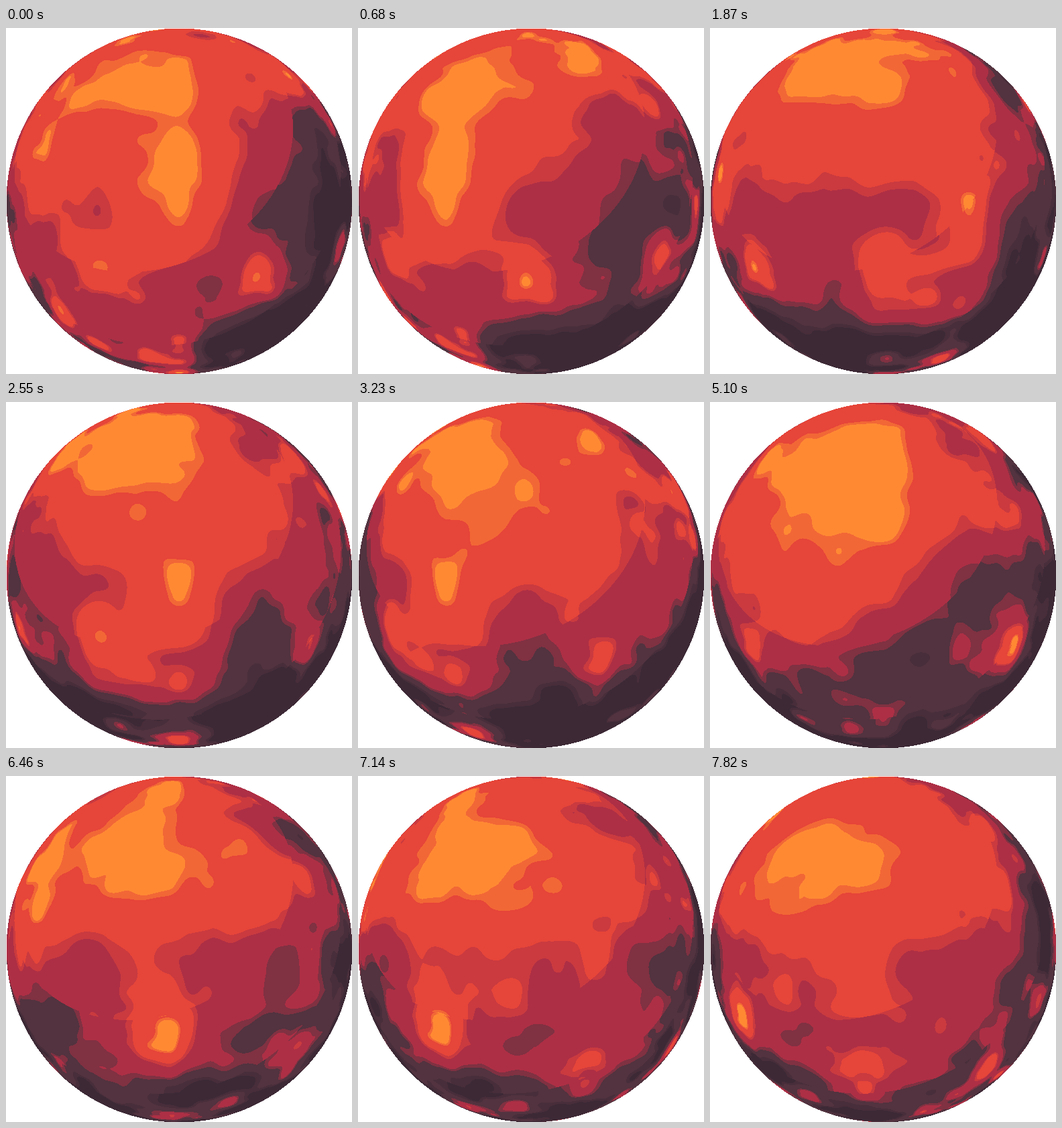
An HTML page with a canvas that plays this animation: 516x516 px, repeating every 7990 ms.

```html
<!DOCTYPE html>
<html lang="en">
<head>
<meta charset="utf-8">
<title>Rotating lava planet</title>
<style>
  html, body { margin: 0; width: 100%; height: 100%; overflow: hidden; background: #fff; }
  canvas { display: block; width: 100vw; height: 100vh; }
</style>
</head>
<body>
<canvas id="planet" width="516" height="516"></canvas>
<script>
const SIZE = 516;
const STEP_MS = 170, STEPS = 47, STEPS_PER_TURN = 60;
const COLS = 16, ROWS = 8;
const LIGHT = { x: 0.4, y: 0.3 };
const COLORS = [[255, 137, 51], [230, 69, 57], [173, 47, 69], [82, 51, 63], [61, 41, 54]];

// Terrain heights in percent; every noise octave reads this wrapping lattice.
const HEIGHTS = [
  [ 0, 60, 40, 20, 10, 20, 40, 10, 40, 40, 80, 40, 70, 50, 35, 60],
  [24, 59, 55, 30, 79, 24, 28,  9, 20, 63, 45, 61, 63, 62, 16, 61],
  [92, 46, 37, 33, 39, 61,  2, 22, 14, 82, 15, 21,  9, 79, 43, 70],
  [33, 49, 30, 81, 26, 63, 97, 53, 55, 51, 58,  5,  3, 31, 23, 25],
  [56, 70, 63, 83, 10, 88, 91, 89, 22, 66, 61, 35, 54, 93, 65, 69],
  [24, 33, 41, 18, 63, 10, 74,  5,  8, 83, 13, 60, 93, 62,  0, 60],
  [ 6, 38,  5,  3, 25, 87, 83, 70, 50, 90, 77, 27, 43, 45, 67, 50],
  [73, 21, 24,  0,  0, 26, 69, 33,  0, 66, 62, 19, 49, 43,  3, 25]
];
const lattice = Float32Array.from(HEIGHTS.flat(), h => h / 100);

const ctx = document.getElementById('planet').getContext('2d');
const image = ctx.createImageData(SIZE, SIZE);
const smooth = t => t * t * (3 - 2 * t);

function noise(x, y) {
  const ix = Math.floor(x), iy = Math.floor(y);
  const left = ix % COLS, right = (ix + 1) % COLS;
  const top = iy % ROWS * COLS, bottom = (iy + 1) % ROWS * COLS;
  const sx = smooth(x - ix), sy = smooth(y - iy);
  const a = lattice[top + left], b = lattice[top + right];
  const c = lattice[bottom + left], d = lattice[bottom + right];
  const upper = a + (b - a) * sx;
  return upper + (c + (d - c) * sx - upper) * sy;
}

const terrain = (x, y) =>
  0.5 * noise(x, y) + 0.25 * noise(2 * x, 2 * y) + 0.125 * noise(4 * x, 4 * y);

// Darkness grows away from the light, with two hard steps.
function darkness(u, v) {
  let d = smooth((Math.hypot(u - LIGHT.x, v - LIGHT.y) + 0.3) / 1.5);
  if (d < 0.362) d *= 0.9;
  if (d < 0.525) d *= 0.9;
  return d * 3.5;
}

// Visible points of the sphere, unwrapped to lattice coordinates.
const points = [];
for (let py = 0; py < SIZE; py++) {
  for (let px = 0; px < SIZE; px++) {
    const x = 2 * px / SIZE - 1, y = 2 * py / SIZE - 1;
    const r2 = x * x + y * y;
    if (r2 >= 0.9999) continue;
    const z = 1 + Math.sqrt(1 - r2);
    const u = x / z / 2 + 0.5, v = y / z / 2 + 0.5;
    points.push({ at: 4 * (py * SIZE + px), x: u * ROWS, y: v * ROWS, dark: darkness(u, v) });
  }
}

const level = shade => Math.min(4, Math.floor(shade * 4));

// Transition bands take the mean of their two neighbouring colours.
const mixes = COLORS.map(a => COLORS.map(b => a.map((n, i) => (n + b[i]) / 2)));

function draw(step) {
  const shift = step * COLS / STEPS_PER_TURN;
  const data = image.data;
  for (const p of points) {
    const shade = p.dark * Math.pow(terrain(p.x + shift, p.y), 0.8);
    const color = mixes[level(shade)][level((shade + 0.02) * 1.05)];
    data[p.at] = color[0];
    data[p.at + 1] = color[1];
    data[p.at + 2] = color[2];
    data[p.at + 3] = 255;
  }
  ctx.putImageData(image, 0, 0);
}

const start = performance.now();
let shown = -1;
function tick() {
  const step = Math.floor((performance.now() - start) / STEP_MS) % STEPS;
  if (step !== shown) draw(shown = step);
  requestAnimationFrame(tick);
}
tick();
</script>
</body>
</html>
```
